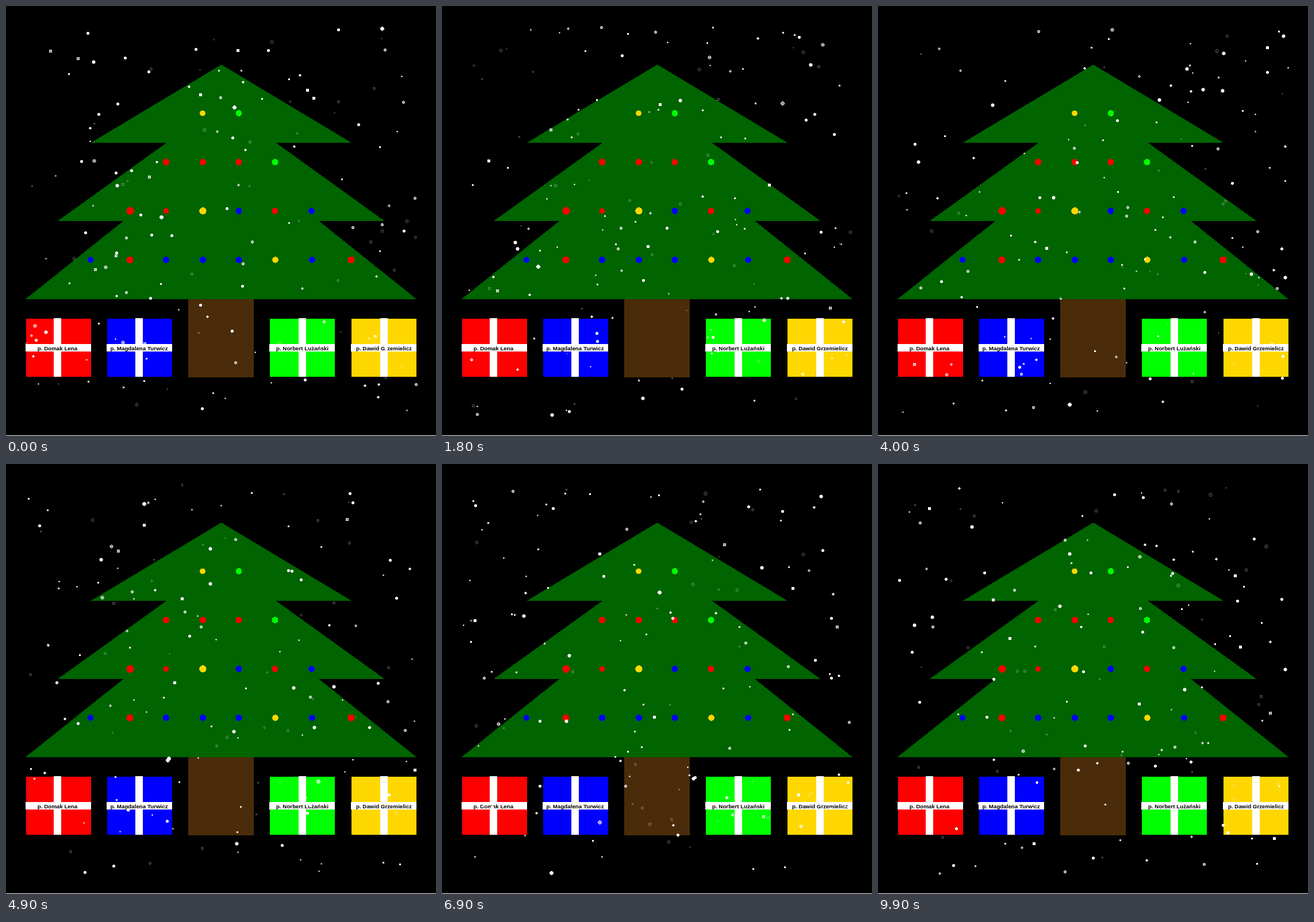
These frames come from a looping animation (748 by 748 pixels, 10 s). An HTML page with a canvas:

```html
<!DOCTYPE html>
<html lang="pl">
<head>
<meta charset="utf-8">
<title>Choinka</title>
<style>
html, body { margin: 0; width: 100%; height: 100%; overflow: hidden; background: #000; }
svg, canvas { position: absolute; left: 0; top: 0; width: 748px; height: 748px; display: block; }
svg { shape-rendering: crispEdges; }
text { font: bold 9.75px "Liberation Sans", Arial, sans-serif; text-anchor: middle; }
</style>
</head>
<body>
<svg id="scene" viewBox="0 0 748 748">
  <g fill="#006400">
    <path d="M374.5 102L601.5 238.3H147Z"/>
    <path d="M374.5 169.5L658.5 374H90Z"/>
    <path d="M374.5 238L714.5 510.3H33.5Z"/>
  </g>
  <path fill="#4a2c0a" d="M317 510H431V646H317Z"/>
  <path fill="#fff" d="M0 747H748V748H0Z"/>
</svg>
<canvas id="snow" width="748" height="748"></canvas>
<script>
const scene = document.getElementById('scene');
const ctx = document.getElementById('snow').getContext('2d');
const RED = '#f00', BLUE = '#00f', GREEN = '#0f0', GOLD = '#ffd700';

function add(tag, attrs, text = '') {
  const el = document.createElementNS('http://www.w3.org/2000/svg', tag);
  for (const key in attrs) el.setAttribute(key, attrs[key]);
  el.textContent = text;
  scene.append(el);
}

const rect = (x, y, width, height, fill) => add('rect', { x, y, width, height, fill });

// Rows of baubles: y, then [x, radius, colour]
const baubles = [
  [186.5, [342, 4.9, GOLD], [405, 5.4, GREEN]],
  [271.5, [278.5, 5.8, RED], [342.5, 5.5, RED], [405, 5.5, RED], [468, 5.6, GREEN]],
  [356.5, [216, 6.6, RED], [278.5, 4.8, RED], [342.5, 6.2, GOLD],
    [405, 5.5, BLUE], [468, 5.5, RED], [531.5, 5.3, BLUE]],
  [441.5, [147, 5.2, BLUE], [215.5, 6, RED], [278.5, 5.6, BLUE], [342.5, 5.5, BLUE],
    [405, 5.6, BLUE], [468.5, 5.3, GOLD], [532.5, 5.3, BLUE], [600.5, 6, RED]]
];
for (const [cy, ...row] of baubles)
  for (const [cx, r, fill] of row) add('circle', { cx, cy, r, fill });

// Gifts: box x, ribbon x, colour, label
const gifts = [
  [35, 83, RED, 'p. Domak Lena'],
  [176, 225, BLUE, 'p. Magdalena Turwicz'],
  [459, 509, GREEN, 'p. Norbert Lużański'],
  [601, 651, GOLD, 'p. Dawid Grzemielicz']
];
for (const [x, ribbon, color, name] of gifts) {
  rect(x, 544, 112.5, 101, color);
  rect(ribbon, 543, 13, 102, '#fff');
  rect(x - 1, 588, 113.5, 13, '#fff');
  add('text', { x: ribbon + 6.5, y: 599 }, name);
}

function seeded(seed) {
  return () => {
    seed = (seed + 0x6D2B79F5) | 0;
    let n = Math.imul(seed ^ (seed >>> 15), seed | 1);
    n ^= n + Math.imul(n ^ (n >>> 7), n | 61);
    return ((n ^ (n >>> 14)) >>> 0) / 4294967296;
  };
}

// A hard-edged disc whose rim is painted twice
function flake(x, y, r) {
  const size = Math.floor(r);
  for (let dy = -size; dy <= size; dy++) {
    const half = Math.floor(Math.sqrt(r * r - dy * dy));
    ctx.fillRect(x - half, y + dy, 2 * half + 1, 1);
    ctx.fillRect(x - half, y + dy, 1, 1);
    ctx.fillRect(x + half, y + dy, 1, 1);
    if (Math.abs(dy) === size) ctx.fillRect(x - half, y + dy, 2 * half + 1, 1);
  }
}

// Snow is scattered afresh on every step
function drawSnow(step) {
  const rnd = seeded(step * 7919 + 17);
  ctx.clearRect(0, 0, 748, 748);
  ctx.fillStyle = '#fff';
  for (let i = 0; i < 150; i++) {
    const x = Math.round(34 + rnd() * 680);
    const y = Math.round(35 + rnd() * 678);
    const r = 1 + rnd() * 2.2;
    const kind = rnd();
    ctx.globalAlpha = kind < 0.22 ? 0.13 : kind < 0.5 ? 0.6 : 1;
    flake(x, y, r);
  }
}

let shown = -1;
function tick() {
  const step = Math.floor(performance.now() / 100) % 100;
  if (step !== shown) drawSnow(shown = step);
  requestAnimationFrame(tick);
}
tick();
</script>
</body>
</html>
```
